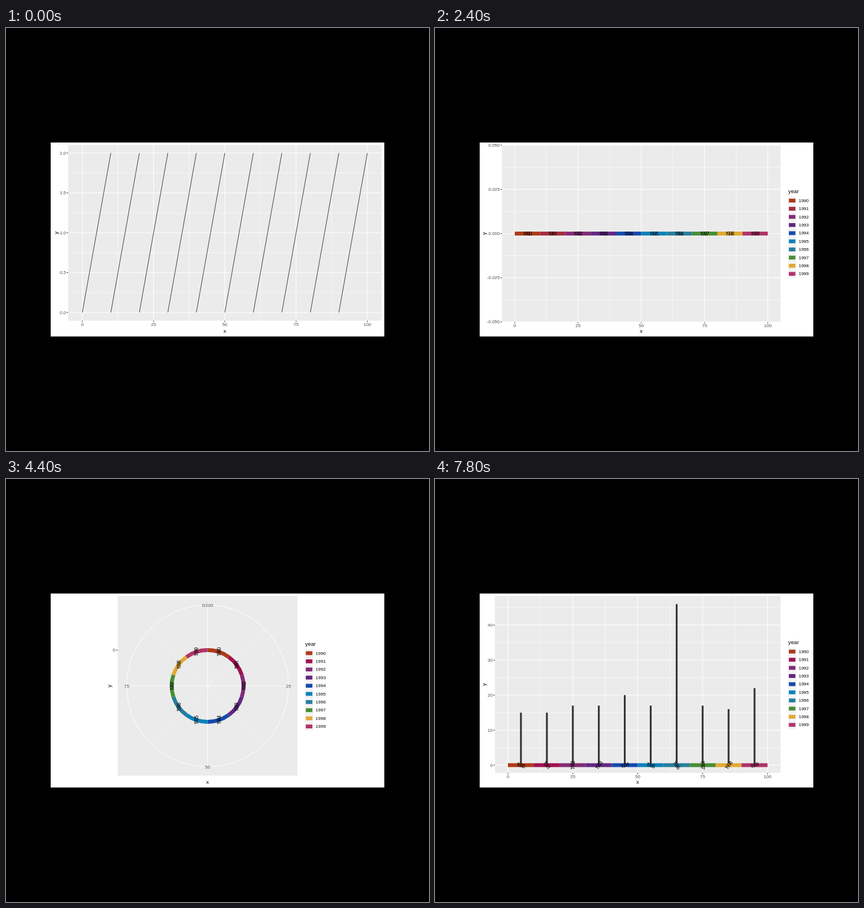
An HTML page with a canvas for the animation above (8 s loop, 748x748 px).

```html
<!DOCTYPE html>
<html lang="en">
<head>
<meta charset="utf-8">
<title>Plot in progress</title>
<style>
  html, body { margin: 0; width: 100%; height: 100%; overflow: hidden; background: #000; }
  canvas { display: block; }
</style>
</head>
<body>
<canvas id="stage" width="748" height="748"></canvas>
<script>
const ctx = document.getElementById('stage').getContext('2d');
const SANS = '"Liberation Sans", Arial, sans-serif';
const TIGHT = { font: '9.4px Roboto, sans-serif', spacing: -1.6 };
const STEP = 200, LOOP = 8000;

const YEARS = Array.from({ length: 10 }, (_, i) => String(1990 + i));
const HUES = ['#f8766d', '#d89000', '#a3a500', '#39b600', '#00bf7d',
  '#00bfc4', '#00b0f6', '#9590ff', '#e76bf3', '#ff62bc'];
const FIRST_COLORS = ['#af3918', '#a62d3b', '#822b75', '#612884', '#154baf',
  '#0b82b9', '#277e9d', '#488e35', '#e3a934', '#b2336a'];
const COLORS = FIRST_COLORS.map((c, i) => i === 1 ? '#a21152' : c);
const SORTED = [...FIRST_COLORS].sort();
const HUES_BY_CODE = FIRST_COLORS.map(c => HUES[SORTED.indexOf(c)]);
const TANGENT = [18, 54, -90, -54, -18, 18, 54, 90, -54, -18];
const COUNTS = [15, 15, 17, 17, 20, 17, 46, 17, 16, 22];

function rect(x, y, w, h, color) {
  ctx.fillStyle = color;
  ctx.fillRect(x, y, w, h);
}

function line(x1, y1, x2, y2, color, width = 1) {
  ctx.strokeStyle = color;
  ctx.lineWidth = width;
  ctx.beginPath();
  ctx.moveTo(x1, y1);
  ctx.lineTo(x2, y2);
  ctx.stroke();
}

function ring(x, y, r, color, width, from = 0, to = 2 * Math.PI) {
  ctx.strokeStyle = color;
  ctx.lineWidth = width;
  ctx.beginPath();
  ctx.arc(x, y, r, from, to);
  ctx.stroke();
}

function text(str, x, y, { font = `8px ${SANS}`, color = '#000', align = 'center', angle = 0, spacing = 0 } = {}) {
  ctx.save();
  ctx.translate(x, y);
  ctx.rotate(angle * Math.PI / 180);
  ctx.font = font;
  ctx.letterSpacing = spacing + 'px';
  ctx.fillStyle = color;
  ctx.textAlign = align;
  ctx.textBaseline = 'alphabetic';
  const m = ctx.measureText('0');
  ctx.fillText(str, spacing / 2, (m.actualBoundingBoxAscent - m.actualBoundingBoxDescent) / 2);
  ctx.restore();
}

const axisText = (str, x, y, align) => text(str, x, y, { color: '#4d4d4d', align });
const title = (str, x, y, opts) => text(str, x, y, { font: `9.7px ${SANS}`, ...opts });
const yearLabel = (i, x, y, angle) => text(YEARS[i], x, y, { ...TIGHT, angle });

function legend({ name = 'year', x, y = 305.2, labels = YEARS, colors, thickness = 6.8 }) {
  title(name, x, y - 16, { align: 'left' });
  labels.forEach((label, i) => {
    const cy = y + i * 14.4;
    rect(x - 0.4, cy - 7.2, 14.4, 14.4, '#f2f2f2');
    rect(x + 1.2, cy - thickness / 2, 11.5, thickness, colors[i]);
    text(label, x + 18.6, cy, { align: 'left' });
  });
}

// x0, x100: pixels of x = 0 and x = 100; y0, unit: pixel of y = 0 and pixels per unit
function cartesian({ left, right, bottom, x0, x100, y0, unit, yTicks, digits, minorY, titleX, draw, key }) {
  const px = x => x0 + (x100 - x0) * x / 100;
  const py = y => y0 - unit * y;
  const top = 207;
  rect(left, top, right - left, bottom - top, '#ebebeb');
  for (const x of [12.5, 37.5, 62.5, 87.5]) line(px(x), top, px(x), bottom, '#fff', 0.6);
  for (const y of minorY) line(left, py(y), right, py(y), '#fff', 0.6);
  for (const x of [0, 25, 50, 75, 100]) {
    line(px(x), top, px(x), bottom, '#fff', 1.1);
    line(px(x), bottom, px(x), bottom + 2.7, '#333');
    axisText(x, px(x), bottom + 7.2);
  }
  for (const y of yTicks) {
    line(left, py(y), right, py(y), '#fff', 1.1);
    line(left - 2.7, py(y), left, py(y), '#333');
    axisText(y.toFixed(digits), left - 4, py(y), 'right');
  }
  draw(px, py);
  title('x', (left + right) / 2, 536.2);
  title('y', titleX, (top + bottom) / 2, { angle: -90 });
  if (key) legend(key);
}

function band(px, y, colors, thickness = 6.8) {
  colors.forEach((c, i) => rect(px(10 * i), y - thickness / 2, px(10) - px(0), thickness, c));
}

function slopes() {
  cartesian({
    left: 110, right: 664, bottom: 517.5, x0: 135, x100: 639, y0: 503, unit: 141,
    yTicks: [0, 0.5, 1, 1.5, 2], digits: 1, minorY: [0.25, 0.75, 1.25, 1.75], titleX: 89,
    draw(px, py) {
      YEARS.forEach((_, i) => line(px(10 * i), py(0), px(10 * i + 10), py(2), '#000', 0.75));
    }
  });
}

const flatAxis = {
  yTicks: [-0.05, -0.025, 0, 0.025, 0.05], digits: 3,
  minorY: [-0.0375, -0.0125, 0.0125, 0.0375]
};
const early = { ...flatAxis, left: 121, right: 609.5, bottom: 517.5, x0: 143, x100: 587, y0: 362.5, unit: 3100, titleX: 89 };
const later = { ...flatAxis, left: 118.5, right: 611, bottom: 519.7, x0: 141, x100: 588.5, y0: 363.5, unit: 3126, titleX: 87 };

function plainLine() {
  cartesian({
    ...early, right: 664, x0: 145.7, x100: 639.3,
    draw: (px, py) => line(px(0), py(0), px(100), py(0), '#000')
  });
}

function hueBand(thickness, labels) {
  cartesian({
    ...early,
    key: { x: 623.2, colors: HUES, thickness },
    draw(px, py) {
      band(px, py(0), HUES, thickness);
      if (labels === 'start') {
        YEARS.forEach((year, i) => text(year, px(10 * i), py(0) + 0.5, { font: `9.6px ${SANS}`, color: HUES[i] }));
      } else if (labels === 'middle') {
        YEARS.forEach((year, i) => text(year, px(10 * i + 5), py(0) + 0.5, { font: `9.6px ${SANS}` }));
      }
    }
  });
}

function codeBand() {
  cartesian({
    ...later, right: 597, x0: 140.5, x100: 575.5,
    key: { name: 'Year_colors', x: 610.8, labels: SORTED, colors: HUES },
    draw(px, py) {
      band(px, py(0), HUES_BY_CODE);
      YEARS.forEach((_, i) => yearLabel(i, px(10 * i + 5), py(0)));
    }
  });
}

function yearBand(colors, angles) {
  cartesian({
    ...later,
    key: { x: 624.6, colors },
    draw(px, py) {
      band(px, py(0), colors);
      YEARS.forEach((_, i) => yearLabel(i, px(10 * i + 5), py(0), angles ? angles[i] : 0));
    }
  });
}

function polar(angles) {
  const cx = 356.5, cy = 366, outer = 143, inner = 63.5;
  rect(197.5, 207, 318, 317.5, '#ebebeb');
  for (let i = 0; i < 8; i++) {
    const a = i * Math.PI / 4;
    line(cx, cy, cx + outer * Math.sin(a), cy - outer * Math.cos(a), '#fff', i % 2 ? 0.6 : 1.1);
  }
  ring(cx, cy, outer, '#fff', 1);
  COLORS.forEach((c, i) => {
    const from = (i / 5 - 0.5) * Math.PI;
    ring(cx, cy, inner, c, 6.8, from, from + Math.PI / 5);
  });
  YEARS.forEach((_, i) => {
    const a = (i + 0.5) * Math.PI / 5;
    yearLabel(i, cx + inner * Math.sin(a), cy - inner * Math.cos(a), angles[i]);
  });
  axisText('0/100', cx, cy - outer);
  axisText('25', cx + outer, cy);
  axisText('50', cx, cy + outer);
  axisText('75', cx - outer, cy);
  axisText('0', 193.3, cy - inner, 'right');
  line(194.8, cy - inner, 197.5, cy - inner, '#333');
  title('x', cx, 536.2);
  title('y', 183, cy, { angle: -90 });
  legend({ x: 529, y: 308, colors: COLORS });
}

function columns(width, color) {
  cartesian({
    left: 106, right: 611, bottom: 519.7, x0: 129, x100: 588, y0: 506, unit: 6.19,
    yTicks: [0, 10, 20, 30, 40], digits: 0, minorY: [5, 15, 25, 35, 45], titleX: 87,
    key: { x: 624.6, colors: COLORS },
    draw(px, py) {
      COUNTS.forEach((n, i) => rect(px(10 * i + 5) - width / 2, py(n), width, py(0) - py(n), color));
      band(px, py(0), COLORS);
      YEARS.forEach((_, i) => yearLabel(i, px(10 * i + 5), py(0), TANGENT[i]));
    }
  });
}

function ringAngles(step) {
  if (step < 25) return YEARS.map(() => -[0, 30, 45, 60, 90, 90, 90][Math.max(0, step - 18)]);
  return TANGENT.map((a, i) => i < 2 * (step - 25) ? a : 0);
}

function draw(step) {
  rect(0, 0, 748, 748, '#000');
  rect(79, 202.5, 590, 343, '#fff');
  if (step < 1) slopes();
  else if (step < 3) plainLine();
  else if (step < 4) hueBand(1);
  else if (step < 5) hueBand(7);
  else if (step < 7) hueBand(7, 'start');
  else if (step < 8) hueBand(7, 'middle');
  else if (step < 12) codeBand();
  else if (step < 17) yearBand(FIRST_COLORS);
  else if (step < 31) polar(ringAngles(step));
  else if (step < 35) yearBand(COLORS, TANGENT);
  else if (step < 37) columns(41, '#595959');
  else if (step < 38) columns(20, '#595959');
  else if (step < 39) columns(9, '#595959');
  else columns(3.2, '#333');
}

const start = performance.now();
function tick() {
  draw(Math.floor((performance.now() - start) % LOOP / STEP));
  requestAnimationFrame(tick);
}
tick();
</script>
</body>
</html>
```
